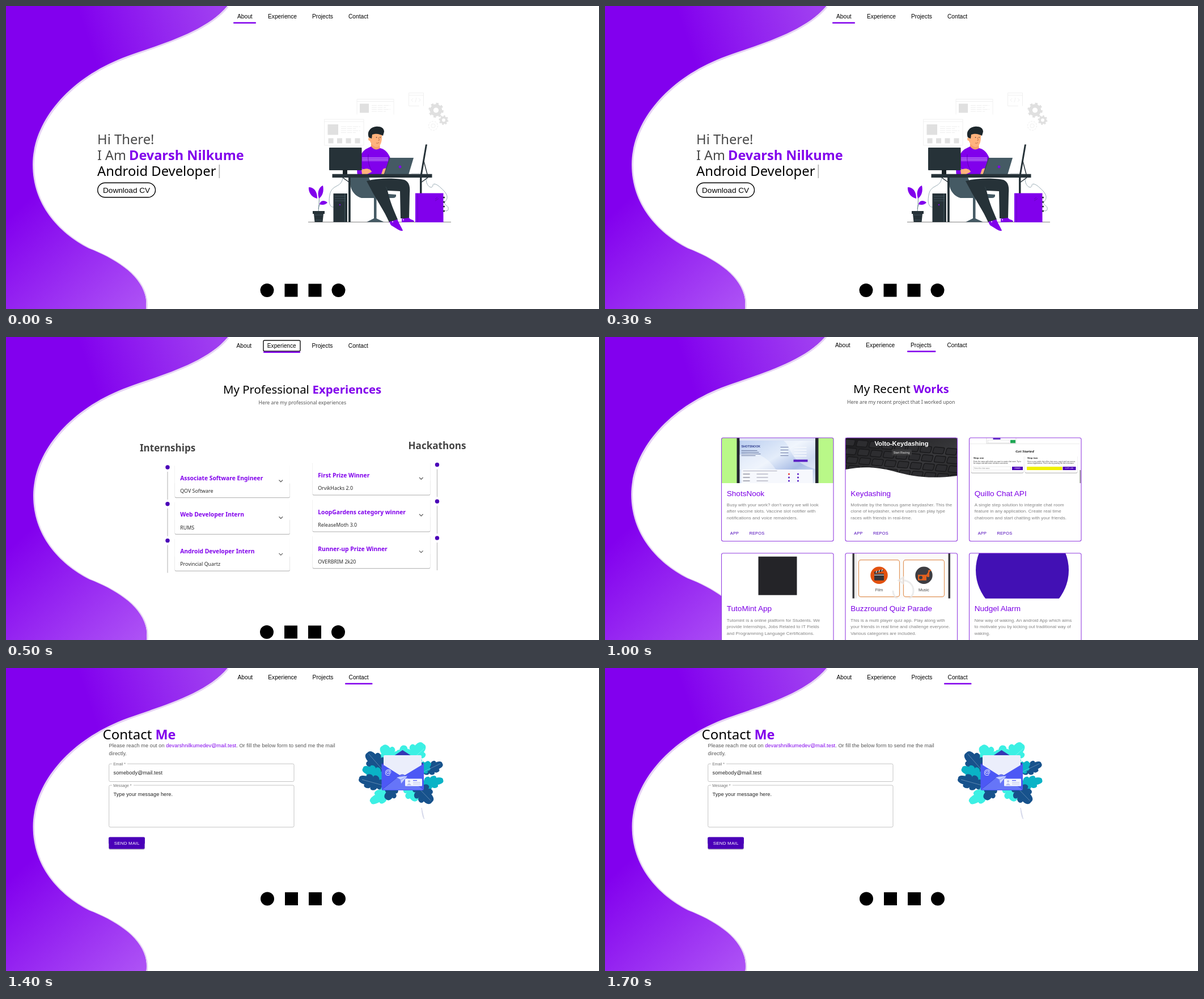
These frames come from a looping animation (1046 px wide and 535 px high, 1900 ms). An HTML page:

```html
<!DOCTYPE html>
<html lang="en">
<head>
<meta charset="utf-8">
<title>Portfolio tour</title>
<style>
html, body { margin: 0; width: 100%; height: 100%; overflow: hidden; background: #fff; }
svg { display: block; width: 1046px; height: 535px; }
text { white-space: pre; }
.ui { font-family: "Liberation Sans", Arial, sans-serif; }
.head { font-family: "Noto Sans", "Open Sans", sans-serif; }
.serif { font-family: "Liberation Serif", Times, serif; }
.b { font-weight: 700; }
</style>
</head>
<body>
<svg id="stage" viewBox="0 0 1046 535" xmlns="http://www.w3.org/2000/svg"></svg>
<script>
const VIOLET = '#8100ec', INDIGO = '#4a00b8', DARK = '#263238', SLATE = '#455a64', SKIN = '#ffb27d';

const rect = (x, y, w, h, fill, more = '') =>
  `<rect x="${x}" y="${y}" width="${w}" height="${h}" fill="${fill}" ${more}/>`;
const circle = (x, y, r, fill, more = '') => `<circle cx="${x}" cy="${y}" r="${r}" fill="${fill}" ${more}/>`;
const path = (d, fill, more = '') => `<path d="${d}" fill="${fill}" ${more}/>`;
const line = (d, color, w = 1, more = '') =>
  `<path d="${d}" fill="none" stroke="${color}" stroke-width="${w}" ${more}/>`;
const text = (x, y, size, str, fill = '#000', cls = 'ui', more = '') =>
  `<text x="${x}" y="${y}" font-size="${size}" fill="${fill}" class="${cls}" ${more}>${str}</text>`;
const raised = (x, y, w, h, fill) =>
  rect(x - .3, y + .4, w + .6, h + .9, '#bdbdbd', 'rx="2.3"') +
  rect(x, y, w, h, fill, 'rx="2"') + rect(x - .4, y - .4, w + .8, h * .6, fill, 'rx="2"');
const MID = 'text-anchor="middle"';

const defs = `<defs>
  <linearGradient id="top" gradientUnits="userSpaceOnUse" x1="150" y1="75" x2="375" y2="0">
    <stop offset="0" stop-color="#a44af2" stop-opacity="0"/><stop offset="1" stop-color="#a040f0"/>
  </linearGradient>
  <linearGradient id="low" gradientUnits="userSpaceOnUse" x1="30" y1="350" x2="215" y2="555">
    <stop offset="0" stop-color="#ad52f5" stop-opacity="0"/><stop offset="1" stop-color="#ad52f5"/>
  </linearGradient>
  <linearGradient id="glass" x1="0" y1="0" x2="1" y2="1">
    <stop offset="0" stop-color="#b9cdf0"/><stop offset=".45" stop-color="#e4edfa"/>
    <stop offset=".7" stop-color="#a9bde6"/><stop offset="1" stop-color="#dfe7f6"/>
  </linearGradient>
  <linearGradient id="keys" x1="0" y1="0" x2="1" y2="1">
    <stop offset="0" stop-color="#19191b"/><stop offset=".6" stop-color="#38383b"/><stop offset="1" stop-color="#222"/>
  </linearGradient>
</defs>`;

function wave(dx, dy = 0) {
  const edge = 'M390 0C352 46 270 68 215 88C110 126 47 205 47 280C47 350 92 400 146 428C200 449 253 484 246.5 535L245 540';
  const shape = edge + 'H-3V-3H392Z';
  return `<g transform="translate(${dx} ${dy})">` +
    line(edge, '#dcc0f0', 4, 'opacity=".7" transform="translate(.8 1)"') +
    path(shape, '#8200ee') + path(shape, 'url(#top)') + path(shape, 'url(#low)') + '</g>';
}

function nav(xs, y, bar, barY) {
  const names = ['About', 'Experience', 'Projects', 'Contact'];
  return names.map((n, i) => text(xs[i], y, 10.2, n)).join('') +
    rect(bar[0], barY, bar[1] - bar[0], 2.6, VIOLET, 'rx="1"');
}

const badges = (x, y) =>
  circle(x, y, 12, '#000') + rect(x + 31, y - 11.5, 23, 23, '#000') +
  rect(x + 73, y - 11.5, 23, 23, '#000') + circle(x + 126, y, 12, '#000');

const gear = (x, y, r, color) =>
  circle(x, y, r * .58, 'none', `stroke="${color}" stroke-width="${r * .46}"`) +
  circle(x, y, r * .87, 'none', `stroke="${color}" stroke-width="${r * .28}" pathLength="16" stroke-dasharray="1"`);

// Lobed leaf growing from (x, y); angle 0 points up.
function leaf(x, y, len, wide, angle, color, lobes = 4) {
  const side = s => {
    let out = '';
    for (let i = 0; i < lobes; i++) {
      const a = i / lobes, m = (i + .6) / lobes, e = (i + 1) / lobes;
      const w = s * wide * Math.sin(Math.PI * (.12 + .8 * m));
      const inner = i === lobes - 1 ? 0 : w * .6;
      out += `C${w * 1.1} ${-len * a} ${w * 1.15} ${-len * (m + .14)} ${inner} ${-len * e}`;
    }
    return out;
  };
  return path('M0 0' + side(1) + 'M0 0' + side(-1), color, `transform="translate(${x} ${y}) rotate(${angle})"`);
}

function office() {
  const pale = '#e0e0e0', faint = '#ececec';
  const frame = (x, y, w, h) => line(`M${x} ${y + h}V${y}H${x + w}V${y + h}M${x} ${y + 4}H${x + w}`, faint, .8);
  const rows = (x, y, w) => [0, 3.5, 7, 10.5].map((d, i) =>
    line(`M${x} ${y + d}h${w - i % 2 * 8}`, faint, .9, 'stroke-dasharray="9 1.5"')).join('');
  let s = frame(619, 164.5, 65, 27) + rect(624, 172.5, 16, 16, pale) + rows(645, 175.5, 33);
  s += frame(561.5, 200, 69.5, 46) + line('M561.5 246H631', faint, .8) + rect(567.5, 209, 18.5, 18.5, pale) + rows(591, 213, 34);
  for (const x of [568.5, 584, 599.5, 615.5]) s += rect(x, 233.5, 9, 9, pale);
  s += frame(710.5, 153.5, 26, 23) + line('M710.5 176.5H729', faint, .8) +
    line('M718 163l-3 3 3 3M728 163l3 3-3 3M724 162l-2 8', faint, .8);
  s += gear(758.5, 184, 13.2, pale) + gear(772, 201.5, 8.4, pale) +
    circle(753.5, 211.5, 8, 'none', `stroke="${faint}" stroke-dasharray="3 2"`) +
    circle(753.5, 211.5, 3.5, 'none', `stroke="${faint}" stroke-width=".8"`);
  s += line('M533 381.5H785', '#777', .9);

  // Cables
  s += line('M594 303C592 322 574 314 571 334C568 350 573 356 578 355', '#90a4ae', .9);
  s += line('M741 303C740 319 752 324 753 317C753 312 760 314 768 322C778 331 781 338 775 345C770 350 779 352 780 356C781 363 776 362 773 361', '#90a4ae', .9);

  // Chair
  s += path('M606 302C606 320 611 334 627 339H682Q689 339 688 333L650 330 640 302Z', SLATE) +
    rect(649, 339, 4.5, 38, SLATE) + path('M651 374L636 381.5H667Z', SLATE);

  // Legs and shoes
  s += path('M636 309C660 303 690 304 703 307C712 311 713 320 712 331L711 375H696L695 327 673 326C677 345 685 363 691 377L676 382C667 361 652 340 644 324Z', DARK);
  s += line('M673 326L670 319', '#37474f', .8);
  s += path('M676 381L690.5 377C694 386 698 391 700 396.5Q697 398 692 395L679 387Z', VIOLET) +
    path('M698 375.5L711 374C713 378 720 377 720 381L698 382Z', VIOLET) +
    circle(682, 381, 1, '#fff') + circle(701, 377.5, 1, '#fff');

  // Upper body
  s += path('M644 240H659L660 254Q651 260 644 252Z', '#f79f6b') +
    path('M644 248Q651 257 660 251C670 253 677 262 680 276L676 292 664 299H620C617 284 623 261 634 253Z', VIOLET);
  for (const y of [268, 270.5, 273]) s += line(`M628 ${y}H674`, '#e9d6fb', .8);
  s += line('M639 262C638 276 641 284 645 290', '#5c00ad', .8) + line('M622 286L641 292', '#e9d6fb', .8);
  s += path('M641 223C639 234 642 245 652 249C660 249 664 242 663 224Z', SKIN) + circle(642, 235, 3, SKIN) +
    path('M640 232C636 222 643 214 652 213C660 212 667 215 667 222L665 229C660 227 656 225 650 226L646 227 645 234Z', '#1d272c') +
    circle(653.5, 232, .8, DARK) + circle(660, 232, .8, DARK) + line('M657 232l1.5 5-2 .5M653 242q3 1 5-1', '#b5613a', .8);
  s += path('M627 290C634 285 644 287 645 293L637 297H628Z', SKIN) + path('M665 288Q670 284 674 290L670 297H662Z', SKIN);

  // Desk and screens
  s += path('M677 268H719L710 298H667Z', SLATE) + line('M677 268L667 298', '#37474f', 1.2) + circle(695, 284, 2.4, VIOLET);
  s += rect(715, 295, 20, 1.3, '#d6dbde');
  s += path('M740 244.5H743L734 297H731Z', DARK) + line('M737 274L743 297', DARK, 1.4);
  s += rect(570, 250, 57.5, 40, DARK, 'rx="1"') + rect(594, 289, 8, 8, '#1a2327');
  s += rect(575.5, 296.7, 176, 6.3, DARK) + rect(604, 303, 3.8, 78.5, DARK) + rect(730, 303, 3.5, 78.5, DARK) +
    line('M594 303L605 311M744 303L733 311', DARK, 1.5);

  // Towers
  s += rect(577.5, 331, 24.5, 50.5, DARK);
  for (const y of [336, 340, 344]) s += line(`M580 ${y}H599`, SLATE, .8);
  s += circle(589, 351, 1.2, VIOLET) + line('M597.5 331V381', SLATE, .8);
  s += rect(722, 330.5, 49.5, 51.5, VIOLET) + line('M726 331V381.5', '#6400bb', .8) +
    line('M757 341l4-3M757 344l6-4', '#5c00ad', .8);
  for (const y of [338, 346, 354, 362]) s += rect(771, y - 1.2, 3, 2.6, DARK);

  // Plant
  s += line('M551 364C552 350 553 342 552 332M551 358Q552 350 557 347', '#607d8b', .9) +
    path('M549 340C538 338 533 327 534 320C544 320 549 328 549 340Z', VIOLET) +
    path('M552 340C548 328 553 319 559 317C561 326 559 335 552 340Z', VIOLET) +
    path('M553 350C554 343 562 342 567 347C564 351 558 352 553 350Z', VIOLET) +
    rect(541, 362, 21, 5, DARK) + path('M543 367H560L558.5 381.5H544.5Z', DARK) + line('M544 369H559M546 378H557', SLATE, .8);
  return s;
}

function about() {
  return wave(0) + nav([408, 462, 540, 604], 21.7, [401, 441], 28.4) +
    text(161, 244, 23.8, 'Hi There!', '#484848', 'head') +
    text(161, 271.5, 23.4, 'I Am', '#484848', 'head') +
    text(217, 271.5, 23.5, 'Devarsh Nilkume', VIOLET, 'head b') +
    text(161, 299.5, 23.8, 'Android Developer', '#000', 'head') +
    rect(375.5, 280, 1.7, 24, '#b5b5b5') +
    rect(161.7, 312.2, 101.8, 25.6, '#fff', 'rx="12.8" stroke="#000" stroke-width="1.4"') +
    text(171, 330, 13.6, 'Download CV') + office() + badges(460.5, 502);
}

function jobs(x, y, w, dotX, list) {
  return list.map(([title, place], i) => {
    const t = y + i * 64.7, d = t + 5;
    return raised(x, t, w, 58, '#fff') +
      text(x + 9.2, t + 27.6, 10.3, title, VIOLET, 'head b') + text(x + 9.2, t + 49.8, 8.9, place, '#2a2a2a', 'head') +
      line(`M${x + w - 19} ${t + 27.5}l3.3 3.3 3.3-3.3`, '#666', 1.3) +
      circle(dotX, d, 3.7, INDIGO) + rect(dotX - .6, d + 8, 1.2, 49, '#bdbdbd');
  }).join('');
}

function experience() {
  return wave(1) + rect(454, 6, 65, 19, '#fff', 'rx="2" stroke="#111" stroke-width="1.4"') +
    nav([406.5, 460.8, 539.5, 603.8], 18.6, [454, 519], 25.4) +
    text(383, 100, 20.4, 'My Professional', '#000', 'head') + text(540.5, 100, 20.4, 'Experiences', VIOLET, 'head b') +
    text(445.5, 118.8, 8.76, 'Here are my professional experiences', '#555', 'head') +
    text(236, 202.2, 17, 'Internships', '#444', 'head b') + text(709.5, 197.6, 17.1, 'Hackathons', '#444', 'head b') +
    jobs(298, 225, 202.5, 285, [['Associate Software Engineer', 'QOV Software'], ['Web Developer Intern', 'RUMS'],
      ['Android Developer Intern', 'Provincial Quartz']]) +
    jobs(541, 220.5, 207, 760.5, [['First Prize Winner', 'OrvikHacks 2.0'], ['LoopGardens category winner', 'ReleaseMoth 3.0'],
      ['Runner-up Prize Winner', 'OVERBRIM 2k20']]) +
    badges(460, 521);
}

// Thumbnails are drawn in a 197.5 by 80 box.
function tabletShot() {
  let s = rect(0, 0, 198, 80, '#b9f888') + rect(27, 0, 144, 80, '#22262e') + rect(32, 0, 133.5, 80, 'url(#glass)');
  s += path('M100 0C130 10 110 40 165 55V0Z', '#fff', 'opacity=".45"') + path('M32 30Q70 18 96 56H32Z', '#fff', 'opacity=".4"');
  s += text(35, 17, 5.2, 'SHOTSNOOK', '#2b3a8c', 'ui b') + rect(32, 0, 133.5, 5, '#dfe6f5');
  for (const y of [22, 25, 28, 31]) s += rect(35, y, 34 - y % 4 * 3, .9, '#5c6a94');
  for (const y of [16, 21, 26, 31]) s += rect(104, y, 14, 1, '#7480a8') + rect(128, y, 22, 2, '#f3f6fc');
  s += rect(127, 38.5, 25, 4, '#5a1fc4') + rect(35, 56, 126, 24, '#f6f8fd');
  for (let i = 0; i < 3; i++) {
    const y = 64 + i * 6;
    s += rect(38, y - .5, 12, 1, '#667') + rect(62, y - .5, 20, 1, '#99a') + circle(119, y, 1.6, i ? '#5a1fc4' : '#e53935') +
      circle(135, y, 1.6, '#5a1fc4');
  }
  return s + rect(38, 58, 60, .8, '#99a');
}

function keyboardShot() {
  let s = rect(0, 0, 198, 80, 'url(#keys)');
  for (let r = 0; r < 5; r++) for (let c = -1; c < 10; c++)
    s += rect(c * 23 + r * 7, r * 15 + 2, 19, 11, '#2d2d30', 'rx="2.5" stroke="#1a1a1c" stroke-width="1.5" transform="skewX(-12) rotate(5)"');
  s += path('M0 56C30 50 55 51 85 59C120 69 150 73 198 67V80H0Z', '#fff');
  return s + text(99, 13.8, 11.3, 'Volto-Keydashing', '#fff', 'ui b', MID) +
    rect(82, 20.5, 35, 10.5, '#3a3a3c', 'rx="1.5"') + text(99, 28, 5.2, 'Start Racing', '#eee', 'ui', MID);
}

function chatShot() {
  let s = rect(0, 0, 198, 80, '#fff') + rect(30.5, -3, 52, 13, '#fff', 'stroke="#ccc" stroke-width=".7"') +
    rect(42, 0, 13, 3, '#5a2bc4') + rect(33, 4, 38, 5, '#fff', 'stroke="#ccc" stroke-width=".5"') + rect(72.5, 3.8, 9, 5.5, '#1fa855') +
    rect(0, 10.5, 195, .6, '#ddd') + text(98, 26.2, 7, 'Get Started', '#111', 'serif b', MID + ' font-style="italic"');
  const step = (x, title, rows) => raised(x, 30.5, 92, 31, '#fff') + text(x + 4, 37, 4.4, title, '#111', 'ui b') +
    rows.map((r, i) => text(x + 4, 42.5 + i * 3.6, 3, r, '#444')).join('');
  s += step(3.5, 'Step one', ['Enter the name with which you want to create chat room. Try to', 'be unique and add some numbers sometimes']) +
    step(98.5, 'Step two', ['Here is your public link of the chat room, copy it and use across', 'various applications. Find it also by pasting the link in browser.']);
  return s + rect(7, 51, 66, 6, '#fff', 'stroke="#ddd" stroke-width=".6"') + text(9, 55, 3, 'Enter the chat name', '#888') +
    rect(75.5, 51, 19, 6, INDIGO) + rect(101.5, 51, 62.5, 6, '#f0f000') + rect(165, 51, 23, 6, INDIGO) +
    text(85, 55, 2.8, 'CREATE', '#fff', 'ui', MID) + text(176.5, 55, 2.8, 'COPY LINK', '#fff', 'ui', MID) +
    rect(194.8, 57, 2.2, 23, '#999');
}

function quizShot() {
  const tile = (x, label) => rect(x, 12, 72, 65, '#fff', 'rx="4" stroke="#e2955a" stroke-width="1.2"') +
    text(x + 36, 67.2, 7.2, label, '#444', 'ui', MID);
  return rect(0, 0, 198, 80, '#fff') + rect(12, 0, 173, 80, '#fbfaf9') + rect(12.5, 0, 3.5, 80, '#3c3c40') + rect(181.5, 0, 3.5, 80, '#3c3c40') +
    rect(18, 0, 1, 80, '#ccc') + tile(23.5, 'Film') + tile(102.5, 'Music') +
    circle(59.5, 39, 15.2, '#e2510f') + rect(51, 36, 17, 12, '#33343a', 'rx="1"') +
    path('M50.5 33L66 28.5 67 31.5 51.5 36Z', '#33343a') + line('M54 35l1.5-4M59 33.5l1.5-4M64 32l1.5-4M51 38.5H68', '#fff', 1.1) +
    circle(138.5, 39, 15.2, '#3d3d42') + path('M128 38H143V48H128Z', '#e2601f') + circle(133, 43, 3, '#3d3d42') +
    line('M141 43L150 29M147 40V31l4-1', '#e2601f', 2) + circle(146, 40, 2.4, '#e2601f') +
    line('M84 66A18 18 0 1 0 102 48M102 43v10l-8-5Z', '#e6e6e6', 3, 'opacity=".75"');
}

const plainSquare = () => rect(0, 0, 198, 80, '#fff') + rect(65, 6, 68, 68, '#242428');
const plainDisc = () => rect(0, 0, 198, 80, '#fff') + circle(93.5, 30, 82, '#4210b4');

function project(x, y, shot, title, rows) {
  const id = 'clip' + x + y;
  return rect(x, y, 197.5, 182.5, '#fff', 'rx="3"') +
    `<clipPath id="${id}"><rect width="197.5" height="80"/></clipPath>` +
    `<g transform="translate(${x} ${y})" clip-path="url(#${id})">${shot()}</g>` +
    rect(x, y, 197.5, 182.5, 'none', 'rx="3" stroke="#9440e0" stroke-width="1.1"') +
    text(x + 9.3, y + 102.7, 13.55, title, '#7d00e6') +
    rows.map((r, i) => text(x + 9.3, y + 121 + i * 11.4, 7.94, r, '#808080', 'ui', 'letter-spacing=".085"')).join('') +
    text(x + 15.3, y + 171.4, 7.37, 'APP', INDIGO, 'ui', 'letter-spacing=".2"') +
    text(x + 49, y + 171.4, 7.37, 'REPOS', INDIGO, 'ui', 'letter-spacing=".2"');
}

function projects() {
  return wave(-.8, -2) + nav([406, 460.3, 539, 603.5], 17.6, [533, 583.5], 24.2) +
    text(438, 99, 20.6, 'My Recent', '#000', 'head') + text(544, 99, 20, 'Works', VIOLET, 'head b') +
    text(427, 117.7, 8.75, 'Here are my recent project that I worked upon', '#555', 'head') +
    project(205.5, 178, tabletShot, 'ShotsNook', ["Busy with your work? don't worry we will look", 'after vaccine slots. Vaccine slot notifier with', 'notifications and voice remainders.']) +
    project(424, 178, keyboardShot, 'Keydashing', ['Motivate by the famous game keydasher. This the', 'clone of keydasher, where users can play type', 'races with friends in real-time.']) +
    project(642.5, 178, chatShot, 'Quillo Chat API', ['A single step solution to integrate chat room', 'feature in any application. Create real time', 'chatroom and start chatting with your friends.']) +
    project(205.5, 381.7, plainSquare, 'TutoMint App', ['Tutomint is a online platform for Students. We', 'provide Internships, Jobs Related to IT Fields', 'and Programming Language Certifications.']) +
    project(424, 381.7, quizShot, 'Buzzround Quiz Parade', ['This is a multi player quiz app. Play along with', 'your friends in real time and challenge everyone.', 'Various categories are included.']) +
    project(642.5, 381.7, plainDisc, 'Nudgel Alarm', ['New way of waking. An android App which aims', 'to motivate you by kicking out traditional way of', 'waking.']);
}

function envelope() {
  const cyan = '#3cf0e4', teal = '#0ab3c6', navy = '#17528c';
  return leaf(688, 172, 42, 17, -35, cyan) + leaf(708, 170, 46, 18, 38, cyan) + leaf(697, 165, 29, 12, 12, cyan, 3) +
    leaf(668, 184, 46, 17, -42, navy) + leaf(668, 194, 42, 13, -66, teal) + leaf(668, 208, 47, 14, -74, navy) +
    leaf(735, 184, 38, 12, 66, navy) + leaf(728, 186, 28, 11, 45, teal) + leaf(728, 207, 44, 12, 78, teal) +
    leaf(690, 210, 54, 14, -120, cyan) + leaf(705, 208, 33, 13, 142, cyan, 3) + leaf(688, 210, 28, 12, -140, navy, 3) +
    leaf(721, 205, 44, 17, 137, navy) +
    line('M668 184L640 152M735 184L766 169M710 167L738 142M721 205L749 234M668 208L628 197', '#fff', .6, 'opacity=".5"') +
    path('M663 169L699.5 145 737 169V190H663Z', '#3438b4') +
    path('M666 156Q666 154 668 154H731Q733 154 733 156V200H666Z', '#ebeefb') +
    path('M662.5 169L699 192 737 169V213Q737 216 734 216H665Q662.5 216 662.5 213Z', '#4c58f5') +
    path('M663 215L694 190Q699 186 704 190L737 215Z', '#6675f8') + line('M663 215L694 190Q699 186 704 190L737 215', '#3a44cf', .7) +
    path('M689 193L708 190.5 697 204 696 197Z', '#c9d2ff') + path('M696 197L708 190.5 694 200Z', '#8d9cf8') +
    text(674, 187.7, 12, '@', '#fff', 'ui', MID) +
    rect(704, 195.5, 30, 13, '#f3f5ff', 'rx="1"') + circle(711, 200, 2.1, '#b9c1ec') + path('M707 207Q711 200 715 207Z', '#b9c1ec') +
    rect(718, 198, 7, 1.2, '#4c58f5') + rect(718, 201.5, 13, 1, '#b9c1ec') + rect(718, 204.5, 13, 1, '#b9c1ec') +
    path('M733 247L737.5 266.5Q734 262 733 247Z', '#d5d8ea', 'stroke="#d5d8ea"');
}

function contact() {
  const ls = 'letter-spacing=".085"';
  const field = (y, h, label, gap, value) =>
    rect(181.7, y, 326.3, h, 'none', 'rx="2.3" stroke="#c4c4c4" stroke-width="1"') + rect(187, y - 2, gap, 4, '#fff') +
    text(189.3, y + 2.5, 6.8, label, '#757575') + text(189.5, y + 18.8, 9.1, value, '#222', 'ui', ls);
  return wave(.5) + nav([408.5, 462.3, 540.6, 604.6], 20, [598, 646.5], 26.5) +
    text(170.5, 125.5, 24, 'Contact', '#000', 'head') + text(263.5, 125.5, 23.4, 'Me', VIOLET, 'head b') +
    text(181.5, 140.2, 9.12, `Please reach me out on <tspan fill="${VIOLET}">devarshnilkumedev@mail.test</tspan>. Or fill the below form to send me the mail`, '#555', 'ui', ls) +
    text(181.5, 153.8, 9.12, 'directly.', '#555', 'ui', ls) +
    field(169.2, 31.3, 'Email *', 27, 'somebody@mail.test') + field(207, 74, 'Message *', 38, 'Type your message here.') +
    raised(181.5, 299, 63, 20.5, INDIGO) +
    text(190.7, 312, 7.94, 'SEND MAIL', '#fff', 'ui', 'letter-spacing=".23"') + envelope() + badges(461, 407.5);
}

const LOOP = 1900;
const scenes = [[0, about], [500, experience], [1000, projects], [1400, contact]];
const stage = document.getElementById('stage');
stage.innerHTML = defs + scenes.map(([, draw]) => `<g class="scene">${draw()}</g>`).join('');

// Each scene is fully shown or hidden between the shared start times.
stage.querySelectorAll('.scene').forEach((el, i) => {
  const frames = scenes.map(([start], j) => ({ offset: start / LOOP, opacity: i === j ? 1 : 0, easing: 'steps(1, end)' }));
  frames.push({ ...frames[frames.length - 1], offset: 1 });
  el.animate(frames, { duration: LOOP, iterations: Infinity });
});
</script>
</body>
</html>
```
